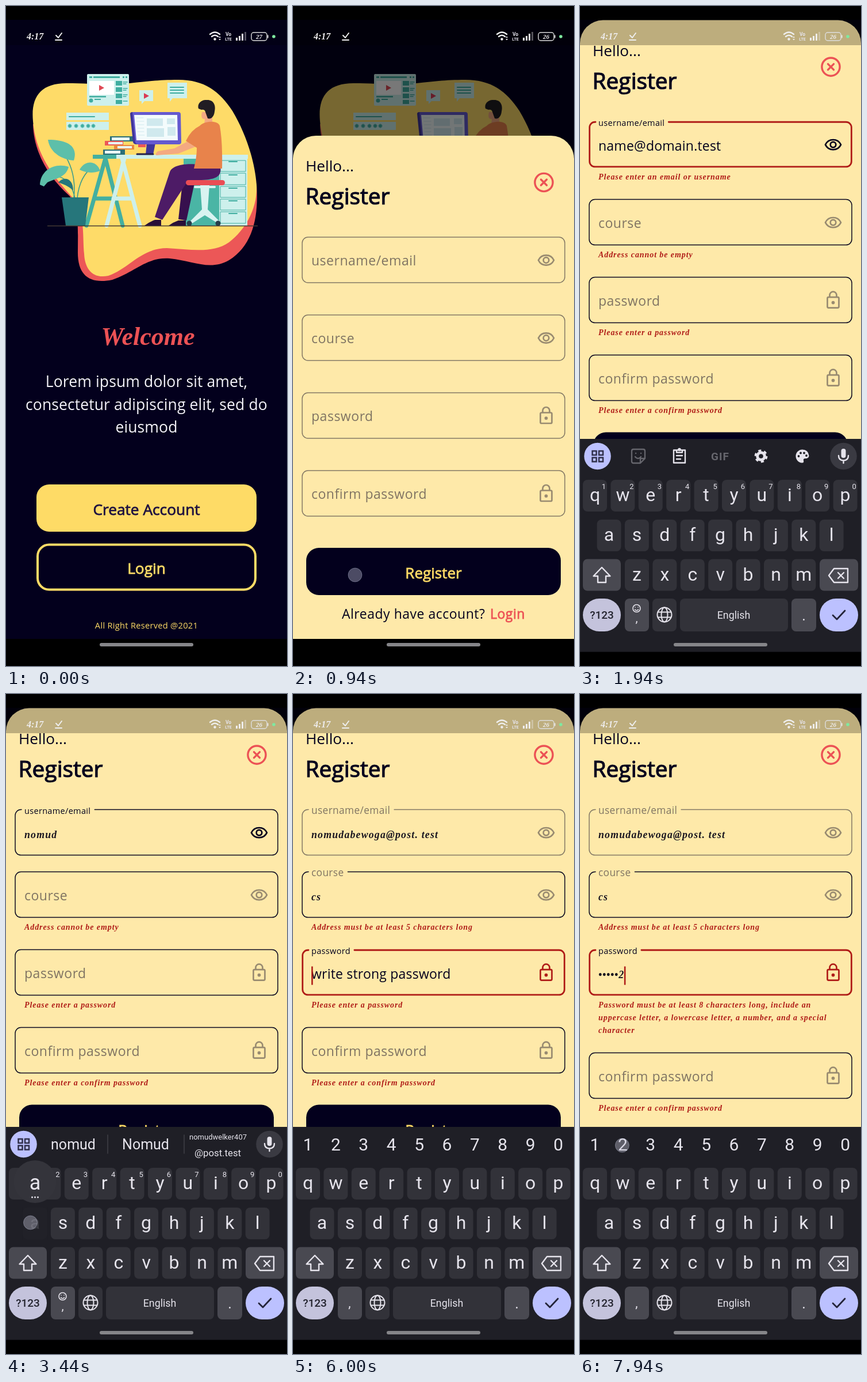
An HTML page that plays this animation: 489x1145 px, repeating every 8000 ms.

```html
<!DOCTYPE html>
<html lang="en">
<head>
<meta charset="utf-8">
<title>Sign-up form</title>
<style>
html, body { margin: 0; width: 100%; height: 100%; overflow: hidden; background: #000; }
svg { display: block; width: 100%; height: 100%; }
text { font-family: "Open Sans", "Noto Sans", sans-serif; white-space: pre; }
.script { font-family: "Liberation Serif", "Noto Serif", serif; font-style: italic; font-weight: 700; }
.key { font-family: Roboto, Inter, sans-serif; fill: #e6e4ec; }
.mid { text-anchor: middle; }
.heavy { stroke: currentColor; fill: currentColor; stroke-width: .8; }
.line { fill: none; stroke-linecap: round; stroke-linejoin: round; }
</style>
</head>
<body>
<svg viewBox="0 0 489 1145" preserveAspectRatio="none">
  <defs>
    <clipPath id="screen"><rect y="24" width="489" height="1074"/></clipPath>
    <clipPath id="kbArea"><rect y="24" width="489" height="1096.500"/></clipPath>
  </defs>
  <rect width="489" height="1145"/>
  <g clip-path="url(#screen)">
    <rect y="24" width="489" height="1074" fill="#03001d"/>
    <g id="art">
      <path fill="#ec5757" d="M47 205C48 252 73 296 110 329C128 350 125 390 125 425C124 468 146 483 185 475C225 461 245 435 285 438C325 442 355 460 388 441C430 415 440 365 436 310L400 200Z"/>
      <path fill="#fedb68" d="M47 200C43 158 60 134 105 134C150 134 175 138 215 134C245 131 265 128 300 128C345 128 372 148 394 182C418 222 433 270 436 310C438 350 418 387 388 410C360 430 320 422 280 420C235 420 215 455 178 468C150 474 137 455 136 430C133 400 138 360 118 335C92 305 52 265 47 200Z"/>
      <!-- floating windows -->
      <rect x="141" y="118" width="73" height="55" rx="2" fill="#cdf0ec"/>
      <path fill="#3fada0" d="M145 122h5v3h-5zM152 122h46v3h-46zM191 130h11v8h-11zM191 141h11v8h-11zM191 152h11v8h-11zM191 163h11v7h-11zM145 156h29v2.5h-29zM154 161h11v2h-11zM203 122h3v3h-3zM208 122h3v3h-3z"/>
      <path class="line" stroke="#3fada0" stroke-width="1.5" d="M204 132h7M204 135h5M204 143h7M204 146h5M204 154h7M204 157h5M204 165h7"/>
      <circle cx="148" cy="164" r="3.5" fill="#3fada0"/>
      <rect x="145" y="130" width="43" height="24" fill="#fff"/>
      <path fill="#e04a55" d="M162 137l9 5-9 5z"/>
      <path fill="#cdf0ec" d="M232 146h24v19h-15l-5 5v-5h-4zM281 133h34v27h-25l-5 6v-6h-4zM105 185h74v13h-74zM105 201h74v14h-74z"/>
      <path fill="#d93b55" d="M240 151l9 5-9 5z"/>
      <path class="line" stroke="#3fada0" stroke-width="2" d="M286 141h23M286 146h23M286 151h23M110 192h44"/>
      <path class="line" stroke="#3fada0" stroke-width="1.6" d="M108 208h6m-3-3v6m-2-5l4 4m0-4l-4 4M119 208h6m-3-3v6m-2-5l4 4m0-4l-4 4M130 208h6m-3-3v6m-2-5l4 4m0-4l-4 4M140 208h6m-3-3v6m-2-5l4 4m0-4l-4 4M149 208h6m-3-3v6m-2-5l4 4m0-4l-4 4"/>
      <!-- cabinet and desk -->
      <rect x="309" y="264" width="64" height="117" fill="#4ab5a5"/>
      <rect x="371" y="260" width="49" height="121" fill="#cdf0ec"/>
      <path fill="none" stroke="#3fada0" d="M373 268h44v19h-44zM373 290h44v20h-44zM373 313h44v19h-44zM373 335h44v19h-44zM373 357h44v20h-44z"/>
      <path class="line" stroke="#3fada0" stroke-width="2" d="M388 270h14M388 293h14M388 316h14M388 338h14M388 360h14"/>
      <path class="line" stroke="#43afa0" stroke-width="7" stroke-linecap="butt" d="M173 264L140 381M173 264L203 381M154 334H190"/>
      <path class="line" stroke="#cdf0ec" stroke-width="7" stroke-linecap="butt" d="M206 264L175 381M202 264L233 381M187 334H219"/>
      <rect x="151" y="258" width="270" height="7" fill="#cdf0ec"/>
      <rect x="151" y="258" width="41" height="7" fill="#43afa0"/>
      <!-- books, monitor -->
      <path fill="#2b6f77" d="M169 249h38v9h-38zM181 226h40v9h-40z"/>
      <path fill="#ec5757" d="M172 234h32v8h-32zM230 236h13v9h-13z"/>
      <path fill="#e9893f" d="M188 241h35v8h-35zM244 232h11v11h-11z"/>
      <path fill="#e9f6f4" d="M184 228h31v5h-31zM178 236h25v4h-25zM172 251h27v5h-27zM194 243h25v4h-25z"/>
      <path fill="#3f3599" d="M216 187q0-3 4-3h5l8 56h-6q-5 0-6-4zM245 238h15l-4 20h-13z"/>
      <path fill="#6559cf" d="M220 184h80q4 0 4 4l1 48q0 4-4 4h-71q-4 0-5-4z"/>
      <path fill="#f3fbfc" d="M223 189h75l1 44h-72z"/>
      <path fill="#d0e9ee" d="M245 195h28v13h-28zM245 212h30v15h-30zM280 195h14v10h-14zM281 210h14v15h-14z"/>
      <path class="line" stroke="#d0e9ee" d="M227 194h12M228 200h12M228 206h12M229 212h11M229 218h11M230 224h11"/>
      <path class="line" stroke="#25214a" stroke-width="3" d="M228 257h28"/>
      <!-- stool and person -->
      <path fill="#d9f3f1" d="M338 311h16l-3 42 20 20-4 3-21-13-22 14-4-3 21-21z"/>
      <path class="line" stroke="#d9f3f1" stroke-width="4" d="M329 314H363"/>
      <circle cx="319" cy="377" r="4.5" fill="#263d4a"/><circle cx="369" cy="377" r="4.5" fill="#263d4a"/>
      <path fill="#37104e" d="M308 298L330 298L314 372L300 370Z"/>
      <path fill="#4d1b66" d="M373 281C376 298 360 301 340 302L316 304L272 371L259 366L285 288C290 274 320 272 340 276Z"/>
      <path fill="#2a1038" d="M241 381q7-6 18-10h11v10zM283 381q8-6 17-9h13v9z"/>
      <rect x="313" y="302" width="68" height="9" rx="4.5" fill="#ea4d55"/>
      <path fill="#f4a981" d="M316 235L293 247L264 252Q258 258 262 259L300 256L330 244ZM341 184Q338 197 346 196L345 206L359 205V184Z"/>
      <path fill="#e8834b" d="M337 208C346 199 369 198 372 208Q377 235 376 282H327Q332 265 332 246L313 234Q322 215 337 208Z"/>
      <path fill="#211d23" d="M335 178C332 168 342 162 349 163C360 162 366 171 363 183C362 193 356 197 351 195L347 184Q346 179 340 180Z"/>
      <!-- plant -->
      <path class="line" stroke="#3d9d8d" stroke-width="1.6" d="M118 333Q124 280 90 242M120 333Q110 290 76 296M124 333Q128 295 152 278"/>
      <path fill="#5dbfaa" d="M73 232C107 232 126 243 118 268C95 266 76 253 73 232ZM59 310C60 284 86 271 109 279C105 298 83 300 72 306L66 313ZM128 284C138 266 158 268 164 286C150 291 138 289 128 284Z"/>
      <path fill="#26767b" d="M91 306C102 294 117 300 117 320C107 311 99 309 91 306ZM97 332H144L138 381H104Z"/>
      <path stroke="#443a33" stroke-width="1.5" d="M72 381.500H438"/>
    </g>
    <text class="script mid" x="247" y="588" font-size="44" fill="#ec5255">Welcome</text>
    <g class="mid" fill="#f4f3f8" font-size="26.5" letter-spacing=".12">
      <text x="244.500" y="661">Lorem ipsum dolor sit amet,</text>
      <text x="244.500" y="700.500">consectetur adipiscing elit, sed do</text>
      <text x="244.500" y="740">eiusmod</text>
    </g>
    <rect x="53" y="830" width="383" height="82" rx="22" fill="#fedb66"/>
    <text class="mid heavy" x="244.500" y="883" font-size="26.3" color="#1f1240">Create Account</text>
    <rect x="55" y="934.500" width="379" height="78" rx="20" fill="none" stroke="#fedb66" stroke-width="4"/>
    <text class="mid heavy" x="244.500" y="985" font-size="26.3" color="#fedb66">Login</text>
    <text class="mid" x="244.500" y="1080" font-size="14.6" letter-spacing=".3" fill="#fedb66">All Right Reserved @2021</text>
    <rect id="dim" y="24" width="489" height="1074"/>

    <g id="sheet">
      <path d="M0 40A40 40 0 0 1 40 0H449A40 40 0 0 1 489 40V1200H0Z" fill="#fee9a9"/>
      <text x="22" y="62" font-size="26.2" fill="#03001d">Hello...</text>
      <text class="heavy" x="21.500" y="119" font-size="38.900" color="#03001d" style="stroke-width:1.2">Register</text>
      <g class="line" stroke="#ec5255" stroke-width="3.4">
        <circle cx="436.500" cy="81" r="15.600"/><path d="M431.500 76l10 10m0-10l-10 10"/>
      </g>
      <g id="fields"></g>
      <g id="foot">
        <rect x="23" width="443" height="82" rx="22" fill="#03001d"/>
        <text class="mid heavy" x="244.500" y="53" font-size="26" color="#fedb66">Register</text>
        <text x="85" y="123" font-size="23" letter-spacing=".5" fill="#03001d">Already have account?</text>
        <text class="heavy" x="343" y="123" font-size="23" letter-spacing=".5" color="#ec5255">Login</text>
      </g>
    </g>
    <rect y="24" width="489" height="44" opacity=".26"/>
  </g>

  <g id="status" fill="#eeecec">
    <text class="script" x="36" y="58" font-size="16">4:17</text>
    <path class="line" stroke="#eee" stroke-width="2" d="M87 51l4 4 6-8M86 59h11"/>
    <path class="line" stroke="#eee" stroke-width="2.400" d="M355 49q8.500-7 17 0M358 53q5.500-4.500 11 0"/>
    <circle cx="363.500" cy="57.500" r="2.200"/><path d="M370 55l2-2.500 2 2.500zM370 57l2 2.500 2-2.500z"/>
    <text class="key mid" x="387" y="51.500" font-size="8.500" font-weight="700">Vo</text>
    <text class="key mid" x="387" y="59.500" font-size="7" font-weight="700">LTE</text>
    <path d="M400 55h3v5h-3zM405 52h3v8h-3zM410 48h3v12h-3z"/><path opacity=".35" d="M415 45h3v15h-3z"/>
    <rect x="427" y="46" width="27" height="14" rx="4" fill="none" stroke="#ddd" stroke-width="1.400"/>
    <rect x="455" y="50.500" width="1.500" height="5"/>
    <text id="charge" class="script mid" x="440.500" y="57" font-size="11"></text>
    <circle cx="466" cy="53" r="2.800" fill="#7fe9a0"/>
  </g>

  <g clip-path="url(#kbArea)"><g id="kb"></g></g>
  <rect x="163" y="1105" width="163" height="6" rx="3" fill="#858589"/>
  <circle id="touch" r="12" fill="#c4c6d8" fill-opacity=".38" stroke="#dfe3ff" stroke-opacity=".3"/>
</svg>

<script>
const LOOP = 8000, INK = '#03001d', RED = '#b01d18';
const FOCUS = [1400, 4510, 5720, Infinity];
const SUBMIT = 930, ACCEPT = 4000;
const MAIL = 'nomudabewoga@post. test';
const PRESSES = [
  { text: 'nomuda', at: [2320, 2470, 2640, 2780, 2920, 3500] },
  { text: 'cs', at: [5150, 5380] },
  { text: 'nomud2', at: [6400, 6680, 6930, 7220, 7520, 7890] },
];
const FIELDS = [
  { label: 'username/email', hint: 'name@domain.test', icon: 'eye' },
  { label: 'course', hint: 'course name', icon: 'eye' },
  { label: 'password', hint: 'write strong password', icon: 'lock' },
  { label: 'confirm password', hint: '', icon: 'lock' },
];
const ICONS = {
  eye: '<path d="M-13.500 0C-8-11.500 8-11.500 13.500 0C8 11.500-8 11.500-13.500 0Z"/><circle r="4.800"/>',
  lock: '<rect x="-10" y="-5.500" width="20" height="18.500" rx="2"/><path d="M-6-6V-9A6 6 0 0 1 6-9V-6"/><circle cy="4" r="1.500"/>',
};

const $ = id => document.getElementById(id);
const clamp = x => Math.min(1, Math.max(0, x));
const mix = (a, b, p) => a + (b - a) * p;
const ramp = (t, start, dur) => { const p = clamp((t - start) / dur); return 1 - (1 - p) ** 3; };
const set = (el, attrs) => { for (const k in attrs) el.setAttribute(k, attrs[k]); };
const say = (el, s) => { if (el.textContent !== s) el.textContent = s; };
const show = (el, on) => el.setAttribute('visibility', on ? 'inherit' : 'hidden');

// form fields
$('fields').innerHTML = FIELDS.map(f => `<g>
  <path class="line"/>
  <text x="32" fill="${INK}"></text>
  <text x="32" y="50" font-size="23" letter-spacing=".2" fill="${INK}">${f.hint}</text>
  <text class="script" x="32" y="49.500" font-size="17.800" fill="#1a1620"></text>
  <rect y="29" width="2.600" height="32"/>
  <g class="line" stroke-width="2.700" transform="translate(440.500 40)">${ICONS[f.icon]}</g>
  <g class="err">${[0, 1, 2].map(i =>
    `<text class="script" x="32" y="${100 + 22 * i}" font-size="14" letter-spacing=".92" fill="${RED}"></text>`).join('')}</g>
</g>`).join('');
const parts = [...$('fields').children].map(g => {
  const [border, label, hint, value, caret, icon, err] = g.children;
  return { g, border, label, hint, value, caret, icon, err: [...err.children], errBox: err };
});

// keyboard
const keyAt = {};
const box = (x, y, w, h, r, fill) => `<rect x="${x}" y="${y}" width="${w}" height="${h}" rx="${r}" fill="${fill}"/>`;
const word = (x, y, s, size, more = '') => `<text class="key mid" x="${x}" y="${y}" font-size="${size}" ${more}>${s}</text>`;
const letters = (row, x0, top) => [...row].map((c, i) => {
  const x = x0 + 48.4 * i;
  keyAt[c] = { x: x + 21, y: top + 26, top };
  return box(x, top, 42, 55, 8, '#323239') + word(x + 21, top + 37, c, 32);
}).join('');
const digitX = i => 26 + 48.4 * i;
const DIGITS = [...'1234567890'];
DIGITS.forEach((d, i) => { keyAt[d] = { x: digitX(i) - 1, y: 783 }; });

$('kb').innerHTML = `<rect y="751" width="489" height="370" fill="#1f1f26"/>
${letters('qwertyuiop', 5, 822)}${letters('asdfghjkl', 29.500, 891)}${letters('zxcvbnm', 78, 959.500)}
${box(5, 959.5, 66, 55, 8, '#494951')}${box(417, 959.5, 67, 55, 8, '#494951')}
${box(5, 1028, 66, 57, 28.5, '#c4c3dc')}${box(78, 1028, 42, 57, 8, '#494951')}${box(126, 1028, 42, 57, 8, '#323239')}
${box(174, 1028, 188, 57, 8, '#323239')}${box(368, 1028, 43, 57, 8, '#494951')}${box(417, 1028, 67, 57, 28.5, '#bcc1ff')}
${word(38, 1063, '?123', 19, 'font-weight="500" style="fill:#23232e"')}${word(267.5, 1063, 'English', 17.8)}${word(389.5, 1066, '.', 25)}
<g class="line" stroke="#e6e4ec" stroke-width="2.400">
  <path d="M38 974L52.500 989H45V1000H31V989H23.500Z"/>
  <path d="M442 976H466V1000H442L433 988ZM449 983l10 10m0-10l-10 10"/>
  <g stroke-width="2"><circle cx="147" cy="1056" r="12.500"/><ellipse cx="147" cy="1056" rx="5.500" ry="12.500"/><path d="M136 1051.500h22M136 1060.500h22"/></g>
  <path stroke="#24243a" stroke-width="2.800" d="M440 1057l7 7 14-15"/>
</g>
<g id="plain"><g>${DIGITS.map((d, i) => word(digitX(i) + 15.5, 837.5, d, 13)).join('')}</g>
  <g class="line" stroke="#e6e4ec" stroke-width="1.600"><circle cx="98.500" cy="1045" r="6.500"/><path d="M95.500 1047q3 3.500 6 0M96 1043h.1M101 1043h.1"/></g>
  ${word(98.500, 1069, ',', 21)}</g>
<g id="secret">${DIGITS.map((d, i) => word(digitX(i), 792, d, 30)).join('')}${word(98.500, 1064, ',', 22)}</g>
<g id="ends">
  <circle cx="30.500" cy="781" r="23.300" fill="#bcc1ff"/>
  <path fill="none" stroke="#30304a" stroke-width="2.500" d="M21.500 772h7v7h-7zM33 772h7v7h-7zM21.500 783.500h7v7h-7zM33 783.500h7v7h-7z"/>
  <circle cx="458.500" cy="781" r="23.300" fill="#3a3a42"/>
  <rect x="454.500" y="768" width="8" height="16" rx="4" fill="#e6e4ec"/>
  <path class="line" stroke="#e6e4ec" stroke-width="2.400" d="M450 780q0 8.500 8.500 8.500t8.500-8.500M458.500 789v4"/>
</g>
<g id="tools">
  <g class="line" stroke="#66666d" stroke-width="2.300"><path d="M93 769H110Q113 769 113 772V785L105 793H93Q90 793 90 790V772Q90 769 93 769ZM113 785H105V793M96 782q5 6 10 0M97 776h.2M106 776h.2"/></g>
  <g class="line" stroke="#e6e4ec" stroke-width="2.400"><path d="M163 770.500h20v22h-20zM168 770.500v4h10v-4M168 780h10M168 786h7"/><circle cx="173" cy="769.500" r="1.600"/></g>
  ${word(244, 788, 'GIF', 19, 'font-weight="700" letter-spacing="1" style="fill:#66666d"')}
  <circle cx="315" cy="781" r="6.300" fill="none" stroke="#e6e4ec" stroke-width="5"/>
  <circle cx="315" cy="781" r="9.600" fill="none" stroke="#e6e4ec" stroke-width="3.600" stroke-dasharray="5.030"/>
  <path fill="#e6e4ec" d="M387 769.500A11.500 11.500 0 1 0 387 792.500Q390 792.500 389 788.500Q388 785 392 785H394Q398.500 784 398.500 780Q397 769.500 387 769.500Z"/>
  <g fill="#1f1f26"><circle cx="380.500" cy="781" r="1.900"/><circle cx="384" cy="775.500" r="1.900"/><circle cx="390" cy="775.500" r="1.900"/><circle cx="394" cy="780" r="1.900"/></g>
</g>
<g id="words">
  <path stroke="#45454c" stroke-width="1.300" d="M177 764.500v33M310 764.500v33"/>
  ${word(117, 790, '', 25)}${word(243, 790, '', 25)}${word(369, 773, '', 13)}${word(368.500, 802, '', 16.800)}
</g>
<rect id="held" width="44" height="57" fill="#1f1f26" opacity=".85"/>
<g id="popup"><circle r="37" fill="#34343b"/>${word(0, 14, '', 36)}
  <g fill="#e6e4ec"><circle cx="-5" cy="27" r="1.500"/><circle cy="27" r="1.500"/><circle cx="5" cy="27" r="1.500"/></g></g>`;
const guesses = [...$('words').querySelectorAll('text')];

// every touch: start, end, x, y
const taps = [[60, 190, 250, 876], [860, 1000, 108, 987], [1310, 1410, 205, 441],
  [3900, 4010, 365, 784], [4410, 4520, 205, 350], [5620, 5730, 215, 485]];
const hits = PRESSES.flatMap((p, i) => p.at.map((at, n) =>
  ({ at, char: p.text[n], key: keyAt[p.text[n]], popup: i < 2 })));
hits.forEach(h => taps.push([h.at - 90, h.at + 75, h.key.x - (h.popup ? 8 : 0), h.key.y]));

function errorOf(i, t) {
  if (t < SUBMIT) return [];
  if (i === 0) return t < PRESSES[0].at[0] ? ['Please enter an email or username'] : [];
  if (i === 1) return [t < PRESSES[1].at[0] ? 'Address cannot be empty' : 'Address must be at least 5 characters long'];
  if (i === 3) return ['Please enter a confirm password'];
  return t < PRESSES[2].at[0] ? ['Please enter a password'] : [
    'Password must be at least 8 characters long, include an',
    'uppercase letter, a lowercase letter, a number, and a special',
    'character'];
}

function valueOf(i, t) {
  const p = PRESSES[i];
  if (!p) return '';
  if (i === 0 && t >= ACCEPT) return MAIL;
  const n = p.at.filter(a => a <= t).length;
  if (i < 2 || !n) return p.text.slice(0, n);
  const last = t - p.at[n - 1] < 1200 ? p.text[n - 1] : '•';
  return '•'.repeat(n - 1) + last;
}

// rounded outline with an opening for the label; thicker lines grow inwards
function outline(gap, width) {
  const d = width / 2 - .75, l = 16 + d, r = 473 - d, b = 79 - d, c = 10 - d, arc = `A${c} ${c} 0 0 1`;
  return `M${gap} ${d}H463${arc} ${r} 10V69${arc} 463 ${b}H26${arc} ${l} 69V10${arc} 26 ${d}H27`;
}

function drawField(i, t, top, errors) {
  const el = parts[i], start = FOCUS[i] ?? Infinity;
  const up = ramp(t, start, 170), away = ramp(t, FOCUS[i + 1] ?? Infinity, 170);
  const focus = up * (1 - away), active = focus > .5, bad = errors.length > 0;
  const fade = bad ? clamp((t - SUBMIT - 20) / 170) : 0;
  const value = valueOf(i, t);
  set(el.g, { transform: `translate(0 ${top})` });

  const size = mix(23, mix(17.25, 14.5, focus), up);
  set(el.label, { y: mix(49, 7, up), 'font-size': size, 'letter-spacing': size * .022,
    opacity: active ? 1 : .5 });
  say(el.label, FIELDS[i].label);
  const gap = up > 0 ? mix(27, 39 + el.label.getComputedTextLength(), up) : 27;
  const width = bad ? mix(1.5, 2.8, focus) : 1.5;
  set(el.border, {
    d: outline(gap, width),
    stroke: active && bad ? RED : '#0b0820',
    'stroke-width': width,
    opacity: active ? 1 : mix(.5, 1, fade),
  });
  set(el.hint, { opacity: active && !value ? up : 0 });
  set(el.value, { 'letter-spacing': i === 2 ? .8 : 1.2 });
  say(el.value, value);

  const keyed = PRESSES[i] ? PRESSES[i].at.filter(a => a <= t).pop() : 0;
  const since = t - Math.max(keyed || 0, start);
  show(el.caret, active && since % 1000 < 500);
  set(el.caret, { x: 32 + (value ? el.value.getComputedTextLength() : 0), fill: bad ? RED : INK });

  set(el.icon, { stroke: active && bad && FIELDS[i].icon === 'lock' ? RED : INK, opacity: active ? 1 : .4 });
  el.err.forEach((line, n) => say(line, errors[n] || ''));
  set(el.errBox, { opacity: fade });
}

function drawKeyboard(t) {
  const k = ramp(t, 1480, 270);
  set($('kb'), { transform: `translate(0 ${370 * (1 - k)})` });
  show($('kb'), k > 0);
  const secret = t >= FOCUS[2] + 70;
  const typed = t < ACCEPT ? valueOf(0, t) : t < FOCUS[2] ? valueOf(1, t) : '';
  show($('plain'), !secret);
  show($('secret'), secret);
  show($('ends'), !secret);
  show($('tools'), !secret && !typed);
  show($('words'), !secret && !!typed);
  const first = t < ACCEPT;
  const third = first ? (typed === 'nomuda' ? 'nomudabewoga' : 'nomudwelker407') : 'class';
  [typed, typed.charAt(0).toUpperCase() + typed.slice(1), third, first ? '@post.test' : '']
    .forEach((s, i) => say(guesses[i], s));

  const hit = hits.find(h => h.popup && t >= h.at - 90 && t < h.at + 20);
  show($('popup'), !!hit);
  show($('held'), !!hit);
  if (hit) {
    set($('popup'), { transform: `translate(${hit.key.x} ${hit.key.top - 45})` });
    set($('held'), { x: hit.key.x - 22, y: hit.key.top - 1 });
    say($('popup').querySelector('text'), hit.char);
  }
  return k;
}

function draw(t) {
  const open = ramp(t, 200, 330), k = drawKeyboard(t);
  set($('dim'), { opacity: .53 * open });
  say($('charge'), t < 500 ? '27' : '26');

  let y = 176;
  FIELDS.forEach((f, i) => {
    const errors = errorOf(i, t);
    drawField(i, t, y, errors);
    y += 108 + (errors.length ? 5 + 22 * errors.length : 0);
  });
  set($('foot'), { transform: `translate(0 ${y - 1})` });
  const rest = Math.max(24.6, 1098 - (y + 157) - 347 * k);
  set($('sheet'), { transform: `translate(0 ${mix(1100, rest, open)})` });

  const tap = taps.find(p => t >= p[0] && t < p[1]);
  show($('touch'), !!tap);
  if (tap) set($('touch'), { cx: tap[2], cy: tap[3] });
}

function tick(now) {
  draw(now % LOOP);
  requestAnimationFrame(tick);
}
draw(0);
requestAnimationFrame(tick);
</script>
</body>
</html>
```
